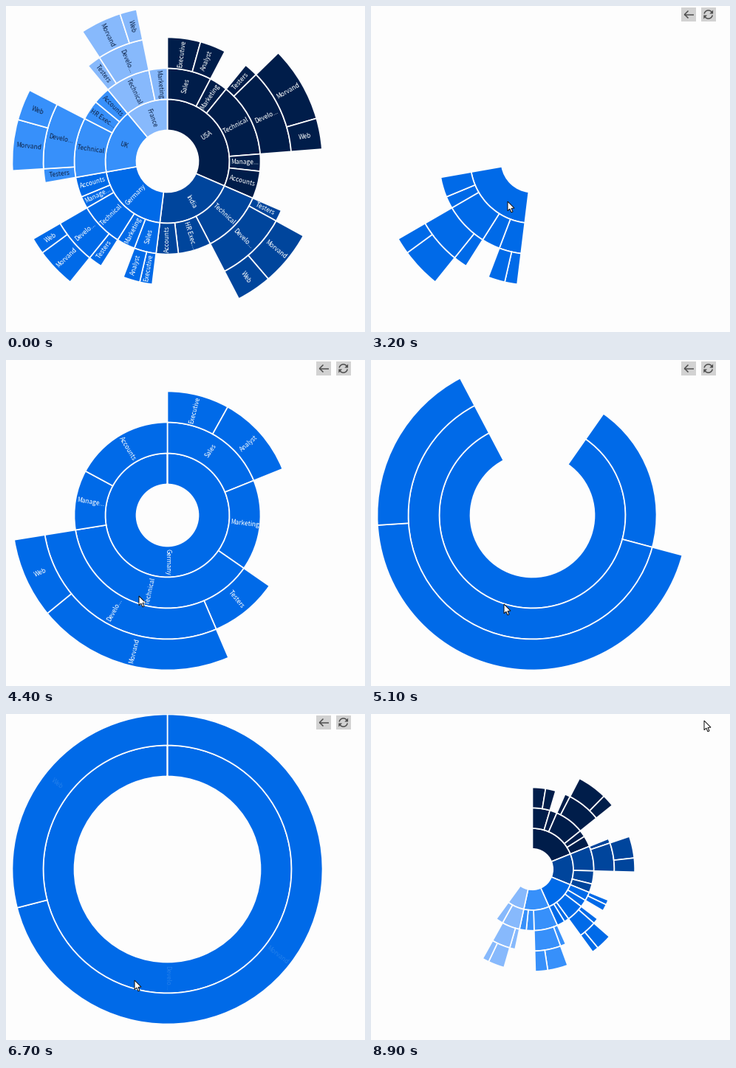
These frames come from a looping animation (486x442 px, 9000 ms). A matplotlib script:

```python
import numpy as np
import matplotlib.pyplot as plt
from matplotlib.animation import FuncAnimation
from matplotlib.patches import Polygon, Rectangle, Wedge

W, H, DPI = 486, 442, 100
CX, CY, RING = 218.5, 210.5, 42
STEP, LOOP = 100, 9000
PT = 72 / DPI
BG, GREY, ICON, HOVER = "#fdfdfd", "#d2d2d2", "#4d4d4d", "#2f95f5"
WHITE, NAVY = "#ffffff", "#10284e"
FONT = "Noto Sans CJK JP"


def technical(size, web=0.29, testers=6.5):
    """Testers, then a development team split between desktop and web."""
    team = size - testers
    return ("Technical", [
        ("Testers", testers),
        ("Develo...", [("Morvand", team * (1 - web)), ("Web", team * web)])])


def sales(executive, analyst):
    return ("Sales", [("Executive", executive), ("Analyst", analyst)])


# Sizes are degrees of the full circle.
MARKETING = ("Marketing", 11.5)
COUNTRIES = [
    ("USA", [sales(15.5, 12.1), MARKETING, technical(46.4),
             ("Manage...", 10.7), ("Accounts", 17.2)]),
    ("India", [technical(39.2, web=0.39, testers=5.4),
               ("HR Exec...", 20.6), ("Accounts", 13.8)]),
    ("Germany", [sales(5.9, 7.9), MARKETING, technical(27.6),
                 ("Manage...", 7.6), ("Accounts", 12.5)]),
    ("UK", [technical(37.3, web=0.38),
            ("HR Exec...", 12.3), ("Accounts", 10.7)]),
    ("France", [technical(28.2), MARKETING]),
]
STYLES = [("#001d4a", WHITE), ("#00459c", WHITE), ("#006ae8", WHITE),
          ("#3790fa", NAVY), ("#87b9fc", NAVY)]


class Node:
    def __init__(self, spec, start, depth, style, parent=None):
        self.name, body = spec
        self.start, self.depth, self.parent = start, depth, parent
        self.fill, self.ink = style
        self.kids, self.end = [], start
        if isinstance(body, list):
            for kid in body:
                self.kids.append(Node(kid, self.end, depth + 1, style, self))
                self.end = self.kids[-1].end
        else:
            self.end = start + body

    def walk(self):
        yield self
        for kid in self.kids:
            yield from kid.walk()

    def find(self, name):
        return next(n for n in self.walk() if n.name == name)


roots = []
for spec, style in zip(COUNTRIES, STYLES):
    roots.append(Node(spec, roots[-1].end if roots else 0, 1, style))
TOTAL = roots[-1].end
germany = roots[2]
tech = germany.find("Technical")
dev = tech.find("Develo...")

fig = plt.figure(figsize=(W / DPI, H / DPI), dpi=DPI, facecolor=BG)
ax = fig.add_axes([0, 0, 1, 1])


def ramp(t, start, end):
    return min(max((t - start) / (end - start), 0), 1)


def segment(node, a0, a1, scale, label, alpha=1):
    r = RING * scale
    a1 = min(a1, a0 + 359.99)
    ax.add_patch(Wedge((CX, CY), r * (node.depth + 1), a0 - 90, a1 - 90,
                       width=r, fc=node.fill, ec=BG, lw=1.7 * PT,
                       alpha=alpha))
    if label > 0:
        mid = (a0 + a1) / 2
        rad = np.radians(mid)
        rm = r * (node.depth + 0.5)
        # Labels on the left half read towards the centre.
        turn = 90 - mid if mid < 180.05 else 270 - mid
        ax.text(CX + rm * np.sin(rad), CY - rm * np.cos(rad), node.name,
                rotation=turn, rotation_mode="anchor", ha="center",
                va="center", family=FONT, size=8.4 * PT, color=node.ink,
                alpha=label)


def overview(sweep=1, scale=1, label=0, alpha=1):
    for root in roots:
        for n in root.walk():
            segment(n, n.start * sweep, n.end * sweep, scale, label, alpha)


def drill(root, p, label=0):
    """Open root from its place in the parent view (p=0) to a full ring."""
    up = root.parent
    base, span = (up.start, up.end - up.start) if up else (0, TOTAL)
    a0 = (root.start - base) / span * 360 * (1 - p)
    a1 = (root.end - base) / span * 360
    a1 += (360 - a1) * p
    k = (a1 - a0) / (root.end - root.start)
    for n in root.walk():
        segment(n, a0 + (n.start - root.start) * k,
                a0 + (n.end - root.start) * k, 1, label)


def chart(t):
    if t < 3100:
        overview(label=1)
    elif t < 3200:
        overview(alpha=0.4)
        drill(germany, 0)
    elif t < 4500:
        drill(germany, ramp(t, 3200, 3800), ramp(t, 3900, 4100))
    elif t < 6000:
        # The sweep stalls for a moment before it closes the ring.
        p = 0.72 * ramp(t, 4500, 4900) + 0.28 * ramp(t, 5100, 5200)
        drill(tech, p, ramp(t, 5200, 5300))
    elif t < 8500:
        drill(dev, ramp(t, 6000, 6600), ramp(t, 6650, 7000))
    elif t > 8500:
        p = (t - 8500) / 400 * 0.6
        overview(p, 0.15 + 0.85 * p)


def line(x, y, color):
    ax.plot(x, y, color=color, lw=1.5 * PT, solid_capstyle="butt")


def button(x, hot):
    ax.add_patch(Rectangle((x, 2), 19.5, 19, fc=HOVER if hot else GREY, lw=0))
    return WHITE if hot else ICON


def toolbar(t):
    if not 3100 <= t < 8500:
        return
    ink = button(420, t == 7500)
    line([424, 436.5], [11.5, 11.5], ink)
    line([429.5, 424.5, 429.5], [6.5, 11.5, 16.5], ink)

    ink = button(447, t >= 7700)
    x, y, r = 456.7, 11.5, 5.6
    a = np.radians(np.linspace(190, 325, 24))
    for s in (1, -1):
        line(x + s * r * np.cos(a), y + s * r * np.sin(a), ink)
        tip = np.array([(6.4, -1), (6.4, -6), (1.6, -1)])
        ax.add_patch(Polygon(s * tip + (x, y), fc=ink, lw=0))


# Cursor moves: start time, end time, place reached.
ENTRY = np.array([8, 420])
MOVES = [(1600, 1800, (69, 338)), (1900, 2600, (185, 265)),
         (3200, 4400, (180, 320)), (4500, 5100, (180, 331)),
         (5800, 6000, (174, 361)), (6800, 7300, (431, 9)),
         (7400, 7800, (451, 9))]
ARROW = np.array([(0, 0), (0, 12.7), (2.9, 10.1), (4.9, 14.8), (7, 13.9),
                  (5, 9.4), (9, 9.1)])


def cursor(t):
    if t < MOVES[0][0]:
        return
    pos = ENTRY
    for start, end, goal in MOVES:
        pos = pos + (np.array(goal) - pos) * ramp(t, start, end)
    ax.add_patch(Polygon(ARROW + pos, fc=WHITE, ec="#101010",
                         lw=1 * PT, joinstyle="miter"))


def tooltip(t):
    if 7900 <= t < 8500:
        ax.add_patch(Rectangle((458.5, 17.5), 40, 15, fc=WHITE, ec="#606060",
                               lw=1 * PT))
        ax.text(462, 25.2, "Reset", family=FONT, size=8.6 * PT,
                color="#606060", va="center_baseline")


def draw(i):
    t = i * STEP
    ax.cla()
    ax.set(xlim=(0, W), ylim=(H, 0))
    ax.axis("off")
    chart(t)
    toolbar(t)
    cursor(t)
    tooltip(t)
    return []


anim = FuncAnimation(fig, draw, frames=LOOP // STEP, interval=STEP,
                     repeat=True)
plt.show()
```
